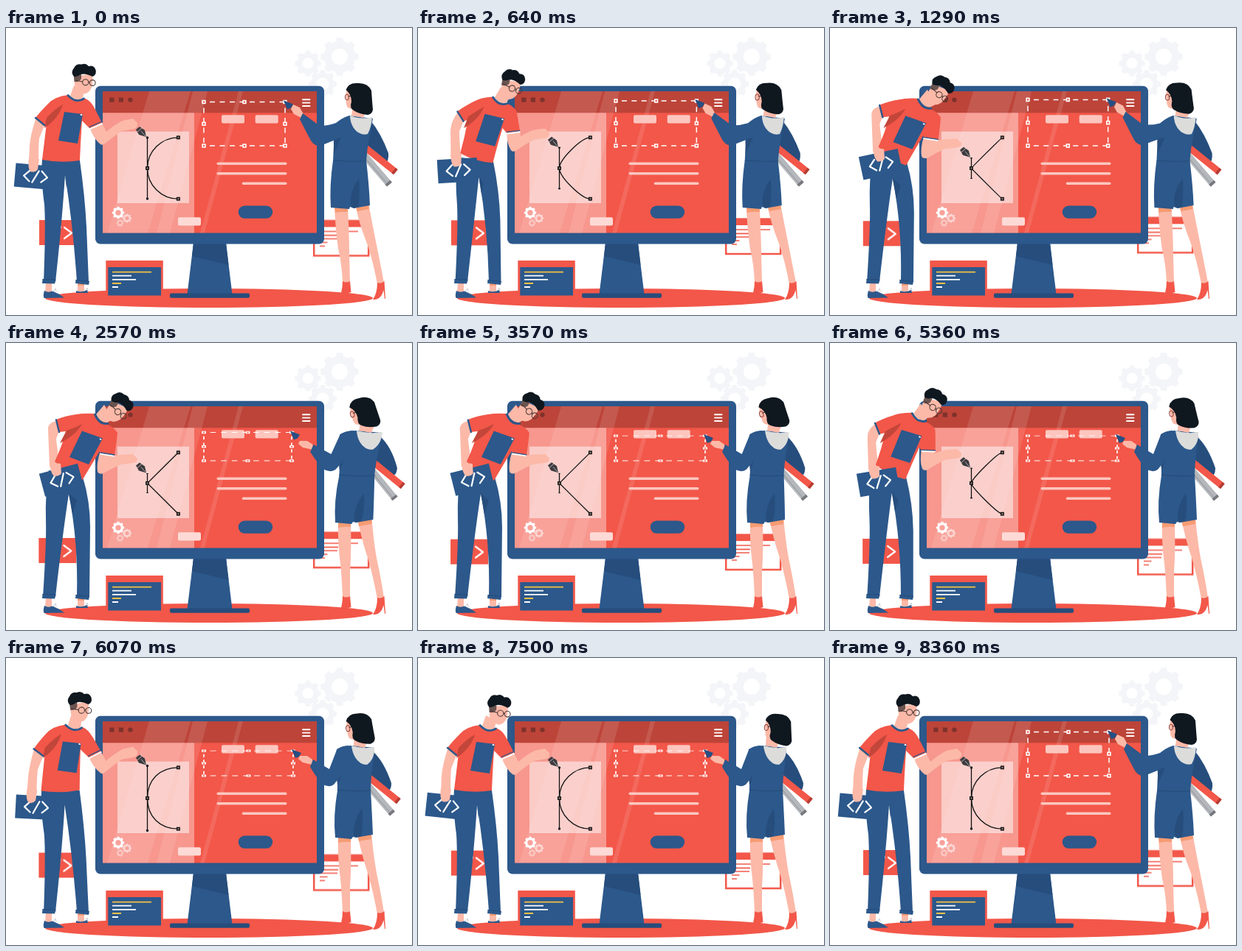
Recreate the animation shown at these times as an HTML page. Size 550 by 390 pixels, loop 8430 ms.

```html
<!DOCTYPE html>
<html lang="en">
<head>
<meta charset="utf-8">
<title>Design team</title>
<style>
html, body { margin: 0; width: 100%; height: 100%; overflow: hidden; background: #fff; }
svg { display: block; width: 100vw; height: 100vh; }
.blue { fill: #2c588b; }
.navy { fill: #264d7c; }
.red { fill: #f25749; }
.fold { fill: #c3463a; }
.skin { fill: #fcb9a8; }
.shade { fill: #f79b72; }
.black { fill: #0f171f; }
.pale { fill: #fcc6bf; }
.white { fill: #fff; }
.line { fill: none; stroke-linecap: round; stroke-linejoin: round; }
.rod { fill: none; stroke-width: 9; }
.code { fill: none; stroke: #fff; stroke-width: 2.2; stroke-linecap: round; stroke-linejoin: round; }
#cardL { animation: sink 4215ms cubic-bezier(.37,0,.63,1) infinite alternate; }
#cardR { animation: bob 4215ms cubic-bezier(.37,0,.63,1) -2250ms infinite alternate; }
@keyframes sink { to { transform: translate(-1px, 6px); } }
@keyframes bob { from { transform: translateY(5.4px); } to { transform: translateY(-5.4px); } }
</style>
</head>
<body>
<svg viewBox="0 0 550 390">
  <g id="cloud" fill="#f4f5f8" fill-rule="evenodd"></g>
  <ellipse class="red" cx="275" cy="367" rx="222" ry="13"/>

  <g id="cardL">
    <rect class="red" x="45" y="261" width="51" height="34"/>
    <path class="code" d="M74 270L68 286M79 271L89 278.5L79 286"/>
  </g>
  <g id="cardR">
    <rect x="417.2" y="263" width="74" height="47" fill="#fff" stroke="#f25749" stroke-width="2.5"/>
    <rect class="red" x="416" y="261.5" width="76.4" height="9.5"/>
    <path d="M425 277H477M425 282.3H450M425 287H449M425 292H435.5M425 297H432" stroke="#f25749" stroke-width="1.7"/>
  </g>

  <rect class="red" x="135.3" y="316" width="77.5" height="48"/>
  <rect class="blue" x="138.3" y="325" width="71.7" height="38.5"/>
  <path d="M144 336.6H170M144 341.9H176M144 352H152" stroke="#fff" stroke-width="1.8"/>
  <path d="M144 331.7H197M144 347H156" stroke="#f3c043" stroke-width="1.8"/>

  <path class="blue" d="M254 292H298L306.500 362H245.500Z"/>
  <path class="navy" d="M254 292H298L301.500 322L252 310Z"/>
  <rect class="navy" x="222" y="360.5" width="108" height="6.300" rx="2"/>

  <rect class="blue" x="121" y="78.7" width="310" height="214.8" rx="7"/>
  <rect class="red" x="131" y="86" width="290" height="192.5"/>
  <rect x="131" y="86" width="290" height="29.3" opacity=".22"/>
  <rect class="white" x="131" y="115.3" width="124" height="163.2" opacity=".38"/>
  <path class="white" opacity=".11" d="M194 86H250L192 278.5H137ZM253 86H273L222 278.5H204ZM315 86H321L269 278.5H263Z"/>
  <rect class="white" x="151" y="140.7" width="97" height="97.3" opacity=".5"/>
  <g fill="#7f322b">
    <rect x="140.3" y="94.5" width="6.2" height="6.2"/>
    <rect x="152.8" y="94.5" width="6.2" height="6.2"/>
    <circle cx="168.5" cy="97.6" r="3.2"/>
  </g>
  <path d="M402 97.2H411.5M402 101.6H411.5M402 106H411.5" stroke="#fff" stroke-width="1.9" stroke-linecap="round"/>
  <g class="pale">
    <rect x="292" y="118.2" width="31" height="11.3" rx="2"/>
    <rect x="337.7" y="118.2" width="31" height="11.3" rx="2"/>
    <rect x="285.5" y="182.4" width="95" height="3.6" rx="1.8"/>
    <rect x="285.5" y="196" width="95" height="3.6" rx="1.8"/>
    <rect x="319.7" y="209.5" width="60.8" height="3.6" rx="1.8"/>
  </g>
  <rect x="233" y="257.3" width="31" height="11.3" rx="2" fill="#fddad6"/>
  <rect class="blue" x="314.7" y="241.5" width="46.5" height="17.2" rx="8.6"/>
  <g id="cogs" fill="#fff" fill-rule="evenodd"></g>

  <g id="select">
    <path d="M268 100.5H378M268 160H378M268 100.5V160M378 100.5V160" fill="none" stroke="#fff" stroke-width="1.5" stroke-dasharray="7 6.500" stroke-dashoffset="-8"/>
    <g id="grips" fill="#f25749" stroke="#fff" stroke-width="1.6"></g>
  </g>

  <g fill="none" stroke="#111" stroke-width="1.3">
    <path id="curve"/>
    <path id="handle"/>
    <g fill="#8a7775">
      <rect x="231.6" y="147" width="3.6" height="3.6"/>
      <rect x="231.6" y="230.4" width="3.6" height="3.6"/>
      <rect x="189.7" y="188.7" width="3.6" height="3.6"/>
    </g>
  </g>
  <ellipse id="dotA" class="black" cx="191.5" rx="1.7"/>
  <ellipse id="dotB" class="black" cx="191.5" rx="1.7"/>

  <g id="man">
    <path class="skin" d="M54 346H62V359H53ZM97 347H106V358H97Z"/>
    <path class="shade" d="M97 347H106V350H97Z"/>
    <path class="blue" d="M52 357Q50 363 51.500 367L79 366.500Q72 361 63 357.500Q57 360 52 357Z"/>
    <path class="blue" d="M95 357Q102 360 110 356L111 360H95Z"/>
    <path class="line" d="M64 358L67 354L68 358M107 357L110 353L111 357" stroke="#b9bcc4" stroke-width=".8"/>
    <path class="blue" d="M49 178L100 180Q107 230 109 270L112 345L96 345Q91 270 80 200Q76 262 67 345L51 345Q54 270 52 240Q47 205 49 178Z"
      data-to="M58 173L104 182Q114 215 114 250L113 345L96 345Q98 270 85 205Q76 265 67 345L50 345Q55 270 54 240Q53 205 58 173Z"/>
    <path class="navy" d="M80 199L82 211L82 218Z" data-to="M85 204L96 214L90 232Z"/>
    <path class="blue" d="M49.500 341L67.500 342L66 347.500L49 347ZM94.500 342L113 344.500L112 349L94 347Z"/>
    <path class="line" d="M50 341.500L67 342M95 342.500L112.500 344.500" stroke="#244a78" stroke-width=".8"/>
    <path class="skin" d="M41 121Q33 145 32 160L31 182L44 182Q44 160 45 150L53 130Z"
      data-to="M69 106Q56 108 57 118L59 168L73 168Q69 140 68 130L72 120Z"/>
    <path class="skin" d="M113 134Q118 150 128 158Q131 160 134 157Q145 148 157 140L174 137Q179 135 178 129L172 123L158 126Q146 132 136 141L129 127Z"
      data-to="M128 146Q122 165 124 175Q126 179 132 177Q144 170 156 165L173 163Q178 162 178 157L172 151L155 152Q146 153 143 154L146 149Z"/>
    <path class="red" d="M84 91Q66 93 57 103Q46 114 40 122L52 132L55 129Q52 155 49 179Q75 184 100 180Q101 155 103 126L114 137L130 129Q122 112 117 104Q112 97 105 95Q95 103 84 91Z"
      data-to="M120 96Q105 95 95 97Q80 99 68 104L72 121L81 120Q76 140 66 161Q82 180 103 187Q113 170 127 147L128 150L147 153Q150 135 151 122Q146 114 137 111Q124 112 120 96Z"/>
    <path class="fold" d="M52 136L55 122Q66 110 77 104Q72 122 52 136Z" data-to="M73 136L82 119Q92 116 103 110Q95 125 73 136Z"/>
    <path class="line" stroke="#2c588b" stroke-width="2.4" d="M40 122L52 132" data-to="M68 104.500L72 121"/>
    <path class="line" stroke="#fff" stroke-width="2" d="M114 137L130 130" data-to="M128 150.500L146 153.500"/>
    <path class="line" stroke="#2c588b" stroke-width="1.3" d="M113 134.500L129 127.500" data-to="M128 149L147 152"/>
    <path class="blue" d="M79 114L104 117L97 157L71 153Z" data-to="M103 119.500L131 129.500L112 165L86 155Z"/>
    <path class="line" stroke="#fff" stroke-width="1.8" d="M101.500 118L102.500 118.200" data-to="M127.500 130.500L128.500 131"/>
    <g id="folder">
      <rect class="blue" x="-28" y="-16" width="54" height="32"/>
      <path class="code" d="M-8 -8L-16 0L-8 7M4 -8L-4 8M8 -8L16 0L8 7"/>
    </g>
    <path class="skin" d="M31 177Q29 190 33 195Q40 197 43 192L45 178Z"
      data-to="M59 162Q60 176 65 181Q73 181 75 177L74 164Z"/>
    <path class="skin" d="M92 78L87 92Q97 101 104 95L106 85Z" data-to="M133 84L122 97Q128 109 137 108L145 104Z"/>
    <path class="line" stroke="#2c588b" stroke-width="2.8" d="M84 91.500Q95 103 105.500 96" data-to="M120.500 97Q126 111 138 109.500"/>
    <g id="manHead">
      <path class="skin" d="M93 66L117 62Q118.500 75 115.500 82Q112 89 106 89.500Q96 88 93 78Z"/>
      <path d="M91.500 61H102V69Q99 74 92.500 73Z" fill="#6a5450"/>
      <path class="black" d="M92 66Q87 60 92 54.500Q95 48 102 49.500Q108 47 112 52Q119 50 121.500 57Q123 64 117 66Q108 61 101 63Q96 67 92 66Z"/>
      <g fill="none" stroke="#4a3836" stroke-width="1.1">
        <circle cx="107.700" cy="73.800" r="4.100"/>
        <circle cx="117.200" cy="74.500" r="3.900"/>
        <path d="M94 71L103.600 73M111.800 73.500L113.400 73.800"/>
      </g>
    </g>
    <g id="nib">
      <path d="M1 1L-9 -2L-13 -9L-8 -13L-1 -8Z" fill="#3b3b40"/>
      <path d="M0 0L-6 -7" stroke="#d8c8c6" stroke-width=".8"/>
      <path d="M-12 -5L-4 -12" stroke="#f4d0ca" stroke-width=".8"/>
    </g>
  </g>

  <g id="woman">
    <path class="skin" d="M445 242L463 244Q465 285 465 305L466 346L456 346Q455 320 450 300Q446 270 445 242Z"
      data-to="M450 242L467 244Q468 285 466 310L466 346L456 346Q455 320 453 300Q449 270 450 242Z"/>
    <path class="skin" d="M473 239L491 238Q496 265 501 290Q508 325 512 346L503 348Q497 315 488 290Q478 265 473 239Z"
      data-to="M476 239L495 238Q498 270 502 292Q509 325 512 346L503 348Q497 315 490 292Q481 265 476 239Z"/>
    <path class="shade" d="M445 242L463 244L463 250Q454 249 446 251ZM473 240L491 238L492 246L476 249Z"
      data-to="M450 242L467 244L467 250Q458 249 450 251ZM476 240L495 238L495 246L478 249Z"/>
    <path class="red" d="M456 344Q461 347 466 344L467.500 359Q461 362 454 360Q456 352 456 344ZM503 346Q508 348 512.500 344L514 368H513L511.500 356Q508 370 497 369Q503 360 503 346Z"/>
    <path class="navy" d="M494 126Q508 143 518 170Q519 182 513 184L486 164Z" data-to="M496 126Q512 140 522 170Q522 182 515 181L489 166Z"/>
    <path class="rod" stroke="#b4b7bb" d="M482 169L519 212" data-to="M486 168L523 211"/>
    <path class="line" stroke="#8f9297" stroke-width="1" d="M486 176L516 211" data-to="M490 175L520 210"/>
    <path class="rod" stroke="#77797e" d="M517 209.700L519.500 212.600" data-to="M521 208.700L523.500 211.600"/>
    <path class="rod" stroke="#f25749" d="M480 157L527 195" data-to="M484 156L531 194"/>
    <path class="rod" stroke="#b53d33" d="M525 193.400L528 195.800" data-to="M529 192.400L532 194.800"/>
    <path class="blue" d="M443 180L488 180Q492 215 493 241L471 245L466 243L465 246L440 244Q438 215 443 180Z"
      data-to="M449 180L494 179Q496 215 497 240L474 244L470 243L468 246L446 244Q443 215 449 180Z"/>
    <path class="navy" d="M478 205Q465 222 467 240L471 245L477 243Q480 222 478 205Z" data-to="M482 204Q470 222 471 240L474 244L481 242Q485 222 482 204Z"/>
    <path class="blue" d="M465 119Q452 123 447 131Q443 150 444 160L443 181L488 181Q489 165 492 150L497 123Z"
      data-to="M469 119Q456 119 448 124Q446 140 449 160L449 181L494 181Q494 165 497 145L499 122Z"/>
    <path class="line" stroke="#244a78" stroke-width=".9" d="M444 180Q466 182 488 181" data-to="M449 179Q470 182 494 180"/>
    <path class="navy" d="M444 152L454 149Q448 162 444 172Z" data-to="M448 163L453 152Q454 166 449 172Z"/>
    <path class="skin" d="M404 119L398 108L389 104L386 110L390 117L400 122Z" data-to="M415 138L408 133L398 133L396 137L402 142L415 145Z"/>
    <path class="blue" d="M402 116L398 124Q407 142 413 153Q418 161 426 160L446 152L459 133L464 120Q456 122 447 129Q436 133 425 133Z"
      data-to="M416 138L412 148Q421 163 428 171Q437 177 444 172L452 162L460 138L464 119Q454 119 448 125Q443 138 438 151Z"/>
    <path class="skin" d="M470 104L468 119L484 122L489 110Z" data-to="M472 104L471 119L486 122L490 110Z"/>
    <path d="M466 119Q482 125 496 121Q495 135 490 144Q479 147 471 136Q466 128 466 119Z" fill="#dcdcdb"
      data-to="M468 119Q484 124 499 121Q500 137 489 145Q479 145 473 135Q469 128 468 119Z"/>
    <g id="womanHead">
      <path class="skin" d="M462 83Q459 92 461 97Q460 104 463 108Q468 111 474 110V84Z"/>
      <ellipse cx="462" cy="94" rx="2.600" ry="4" fill="none" stroke="#8d3f3a"/>
      <path class="line" d="M464 93L469 92" stroke="#333"/>
      <path class="black" d="M460.500 84Q464 74 476 75Q490 74 495 85Q496 100 497 111Q496 117 490 118Q478 117 471 112Q465 109 468 100Q468 90 460.500 84Z"/>
    </g>
    <path id="tip" d="M-2 -2L11 3L8 8L3 10Z" fill="#264f83"/>
  </g>
</svg>
<script>
const LOOP = 8430;
const $ = id => document.getElementById(id);
const NS = 'http://www.w3.org/2000/svg';

function add(parent, tag, attrs) {
  const el = document.createElementNS(NS, tag);
  for (const k in attrs) el.setAttribute(k, attrs[k]);
  parent.appendChild(el);
}

function gear(parent, cx, cy, r, hole, opacity = 1) {
  const teeth = 8, pts = [];
  for (let i = 0; i < teeth; i++) {
    [[-.3, .83], [-.2, 1], [.2, 1], [.3, .83]].forEach(([off, k]) => {
      const a = (i + off) * 2 * Math.PI / teeth;
      pts.push((cx + r * k * Math.cos(a)).toFixed(1) + ' ' + (cy + r * k * Math.sin(a)).toFixed(1));
    });
  }
  const ring = `M${cx - hole} ${cy}a${hole} ${hole} 0 1 0 ${2 * hole} 0a${hole} ${hole} 0 1 0 ${-2 * hole} 0Z`;
  add(parent, 'path', { d: `M${pts.join('L')}Z${ring}`, opacity });
}

gear($('cloud'), 452, 39, 26, 11);
gear($('cloud'), 409, 48, 17.8, 7.5);
gear($('cloud'), 429, 76, 19.2, 8.5);
gear($('cogs'), 152, 251, 8.3, 3.7);
gear($('cogs'), 164, 258.5, 6.2, 2.6, .55);
gear($('cogs'), 154.5, 265, 5, 2.1, .4);

for (const x of [268, 323, 378])
  for (const y of [100.5, 130.2, 160])
    if (x !== 323 || y !== 130.2)
      add($('grips'), 'rect', { x: x - 1.9, y: y - 1.9, width: 3.8, height: 3.8 });

// Rows are [time, ...values], eased between neighbours.
const tracks = {
  lean: [[0, 0], [1290, .97], [2570, 1], [5100, .98], [5950, -.09], [7500, 0], [LOOP, 0]],
  manHead: [[0, 0, 0, 0], [1290, 39.5, 19, 31], [2570, 43, 22, 33], [4570, 41, 21, 32], [5100, 41, 20.5, 32],
    [5950, -5.5, -3, -2], [7500, 4, 1.5, 2], [8360, 0, 0, 0], [LOOP, 0, 0, 0]],
  folder: [[0, 40, 202, 5], [1290, 69.5, 185, -12], [2570, 76, 186, -15], [4570, 73, 185, -13], [5100, 73, 185, -13],
    [5950, 41, 203, 3], [7500, 39, 201.5, 6], [8360, 40, 202, 5], [LOOP, 40, 202, 5]],
  pull: [[0, 0], [1290, -.12], [1650, -.12], [2570, .82], [3100, 1], [7500, 1], [8360, 0], [LOOP, 0]],
  pose: [[0, 0], [1290, -.1], [1650, -.1], [2570, 1], [7500, 1], [8360, 0], [LOOP, 0]],
  sway: [[0, 0], [1650, 0], [2600, 1], [3600, .3], [4570, 0], [LOOP, 0]],
  womanHead: [[0, 0, 0, 0], [1290, -4, -.7, -3], [1650, -4, -.7, -3], [2570, 11, -1.5, -14], [4570, 3, -1.5, -13],
    [6070, 3, 0, -6], [7500, 9.3, 1, 2], [8360, 0, 0, 0], [LOOP, 0, 0, 0]]
};

function at(name, t) {
  const keys = tracks[name];
  const i = keys.findIndex(k => k[0] > t);
  const a = keys[i - 1], b = keys[i];
  const k = (1 - Math.cos(Math.PI * (t - a[0]) / (b[0] - a[0]))) / 2;
  return a.slice(1).map((v, j) => v + (b[j + 1] - v) * k);
}

const NUM = /-?\d+(?:\.\d+)?/g;
const parts = id => [...$(id).querySelectorAll('[data-to]')].map(el => {
  const d = el.getAttribute('d');
  return { el, ops: d.split(NUM), from: d.match(NUM).map(Number), to: el.dataset.to.match(NUM).map(Number) };
});
const manParts = parts('man'), womanParts = parts('woman');

function morph(list, k, bend = () => 0) {
  for (const { el, ops, from, to } of list) {
    const v = from.map((n, i) => n + (to[i] - n) * k);
    for (let i = 0; i < v.length; i += 2) v[i] += bend(v[i], v[i + 1]);
    el.setAttribute('d', ops.map((op, i) => op + (i < v.length ? v[i].toFixed(2) : '')).join(''));
  }
}

const clamp = (v, lo, hi) => Math.min(hi, Math.max(lo, v));
const place = (id, value) => $(id).setAttribute('transform', value);

function draw(t) {
  const [lean] = at('lean', t), [pull] = at('pull', t), [pose] = at('pose', t), [sway] = at('sway', t);

  morph(manParts, lean);
  let [x, y, r] = at('manHead', t);
  place('manHead', `translate(${x} ${y}) rotate(${r} 112 74)`);
  [x, y, r] = at('folder', t);
  place('folder', `translate(${x} ${y}) rotate(${r})`);

  // Anchor handles shrink as the curve straightens.
  const round = 1 - lean, half = 13 + 28.5 * round, c = 23 * round;
  const mid = 190.5, top = mid - half, low = mid + half;
  $('curve').setAttribute('d', `M233.4 148.8C${233.4 - c} 148.8 191.5 ${mid - c} 191.5 ${mid}S${233.4 - c} 232.2 233.4 232.2`);
  $('handle').setAttribute('d', `M191.5 ${top}V${low}`);
  for (const [id, cy] of [['dotA', top], ['dotB', low]]) {
    $(id).setAttribute('cy', cy);
    $(id).setAttribute('ry', half / 25);
  }
  place('nib', `translate(189 ${top - 2})`);

  // The upper body leans back, more so away from the screen.
  morph(womanParts, pose, (px, py) =>
    sway * 8 * clamp((245 - py) / 140, 0, 1) * clamp((px - 410) / 60, 0, 2.2));
  [x, y, r] = at('womanHead', t);
  place('womanHead', `translate(${x} ${y}) rotate(${r} 478 112)`);
  const sx = 1 + .1 * pull, sy = 1 - .43 * pull;
  place('select', `translate(268 160) scale(${sx} ${sy}) translate(-268 -160)`);
  place('tip', `translate(${268 + 110 * sx} ${160 - 59.5 * sy})`);
}

const start = performance.now();
function tick() {
  draw((performance.now() - start) % LOOP);
  requestAnimationFrame(tick);
}
tick();
</script>
</body>
</html>
```
